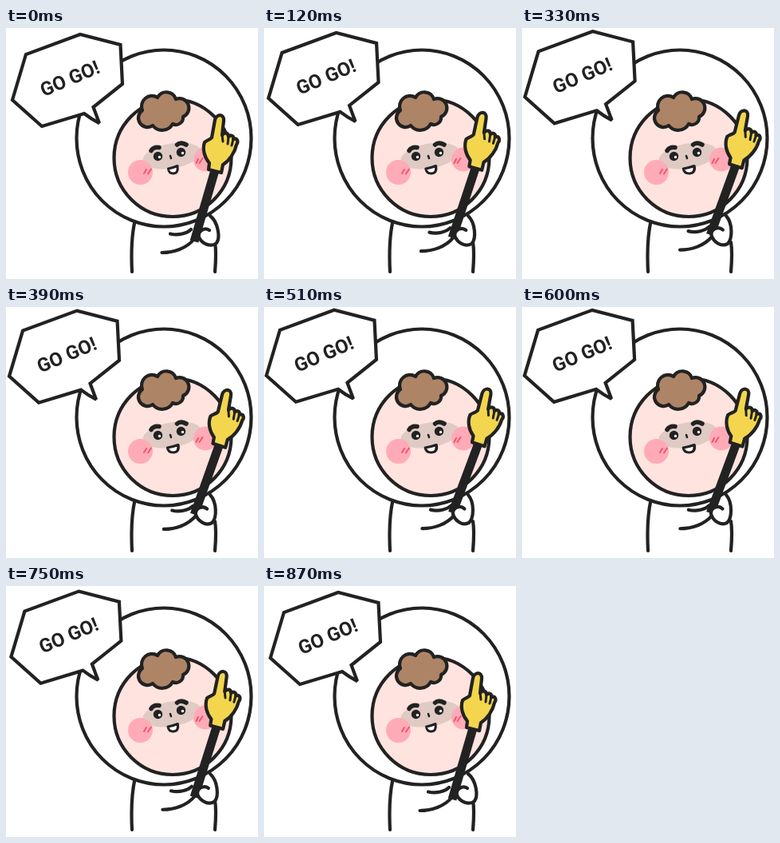
An HTML page for the animation above (1.35 s loop, 316 px wide and 314 px high).

```html
<!DOCTYPE html>
<html lang="en">
<head>
<meta charset="utf-8">
<title>Go go!</title>
<style>
  html, body { margin: 0; width: 100%; height: 100%; overflow: hidden; background: #fff; }
  svg { display: block; width: 100vw; height: 100vh; }
  .line { fill: none; stroke: #222; stroke-width: 4.2; stroke-linecap: round; stroke-linejoin: round; }
  .white { fill: #fff; }
  text { font: 600 24px Roboto, "Open Sans", sans-serif; fill: #222; text-anchor: middle; }
</style>
</head>
<body>
<svg viewBox="0 0 316 314">
  <g class="line">
    <path d="M161.500 242C157 262 157 285 158 305"/>
    <path d="M262 268C264 280 263 293 262 305"/>
    <ellipse class="white" cx="198" cy="138" rx="109.500" ry="110.500"/>
    <circle cx="209" cy="162.500" r="73.500" fill="#ffe3de"/>
    <path fill="#ae8467" d="M171 103A13 13 0 0 1 190 87A12.500 12.500 0 0 1 213 89A11.500 11.500 0 0 1 222 111A9 9 0 0 1 209 120A15 15 0 0 1 184 122A11 11 0 0 1 171 103Z"/>
  </g>

  <ellipse cx="208" cy="160" rx="37" ry="15.500" fill="#dfcac4" transform="rotate(-10 208 160)"/>
  <g fill="#ffabb7">
    <circle cx="168.500" cy="180.500" r="15.500"/>
    <circle cx="250" cy="164.500" r="15"/>
  </g>
  <path d="M176 177l-3 5M182 176.500l-4 6M241 164l-2.500 5M246.500 163l-4 6" fill="none" stroke="#f4546c" stroke-width="2" stroke-linecap="round"/>
  <g fill="#222">
    <circle cx="190.500" cy="160.500" r="5.700"/>
    <circle cx="219.500" cy="155.500" r="5.700"/>
  </g>
  <g fill="#fff">
    <circle cx="192.500" cy="161.500" r="1.700"/>
    <circle cx="221.500" cy="156.500" r="1.700"/>
  </g>
  <path class="line" style="stroke-width:2.500" d="M206 160l1 3"/>
  <path class="line" style="stroke-width:5.500" d="M182 153.500Q185 148.500 192 149.500M214.500 146Q219 142 226 146"/>
  <path class="line white" id="mouth" style="stroke-width:3" d="M203.500 176Q209 175 215 172.500Q216.500 181.500 210 182Q204 182 203.500 176Z"/>

  <path class="line" id="arm" d="M206 257.500C216 260 227 257 232 252M195.500 281C210 281 226 276 236 264"/>

  <g id="wand">
    <path d="M262 178L236 267" stroke="#222" stroke-width="11" fill="none"/>
    <path class="line" fill="none" style="fill:#f3d64e" d="M262 115C264 107 274 107 273 116L271 134C274 130 279 131 279 136C282 133 286 135 285 139C290 137 292 142 289 146C287 156 280 166 272 171L270 181L254 177L255 169C249 162 246 152 249 143C252 140 256 140 258 137Z"/>
    <path class="line" style="stroke-width:3" d="M271 134L272 142M279 136L278 145M285 139L283 147"/>
  </g>
  <path class="line white" id="hand" d="M256 235C266 243 269 262 264 269C257 275 246 270 242 262C240 254 249 249 255 253"/>

  <g id="bubble">
    <path class="line white" style="stroke-linejoin:miter;stroke-miterlimit:2" d="M8 90L25 33L93 8L143.500 21L146 70L109.500 99L117 119Q107 114 98 107L45 123Z"/>
    <text transform="translate(80 63) rotate(-23)" y="8.500">GO GO!</text>
  </g>
</svg>
<script>
const LOOP = 1350, STEP = 30;

// Smooth ramp from 0 to 1 over the given span
function ease(t, from, to) {
  const u = Math.min(1, Math.max(0, (t - from) / (to - from)));
  return (1 - Math.cos(Math.PI * u)) / 2;
}

// Raise, dip a little, raise again, then return to rest
function swing(t) {
  const dip = ease(t, 250, 385) - ease(t, 385, 550);
  return ease(t, 0, 250) - 0.24 * dip - ease(t, 550, 870);
}

const poses = {
  bubble: p => `translate(${-5.2 * p} ${-4.4 * p})`,
  wand: p => `translate(${7 * p} ${-7.5 * p}) rotate(${4.4 * p} 262 179)`,
  arm: p => `translate(${3 * p} ${-4 * p})`,
  hand: p => `rotate(${12 * p} 256 235)`,
  mouth: p => `translate(209.5 177) scale(${1 + 0.2 * p} 1) translate(-209.5 -177)`
};

function draw(now) {
  const p = swing(Math.floor(now % LOOP / STEP) * STEP);
  for (const id in poses) {
    document.getElementById(id).setAttribute("transform", poses[id](p));
  }
}

const start = performance.now();
function tick() {
  draw(performance.now() - start);
  requestAnimationFrame(tick);
}
tick();
</script>
</body>
</html>
```
